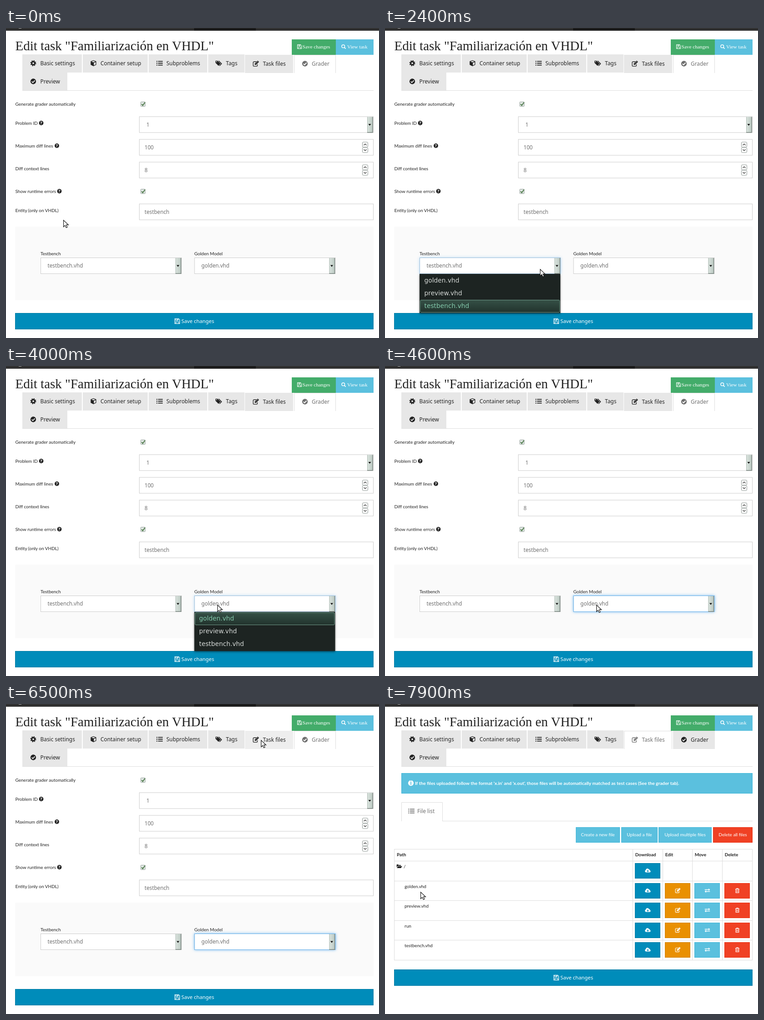
Write an HTML page that moves like this. It is 821 px wide and 682 px high and loops after 8 s.

```html
<!DOCTYPE html>
<html lang="en">
<head>
<meta charset="utf-8">
<title>Edit task</title>
<style>
html, body { margin: 0; width: 100%; height: 100%; overflow: hidden; background: #fff; }
svg { display: block; }
text { font-family: "Noto Sans", sans-serif; font-size: 11.9px; fill: #222; white-space: pre; }
.title { font: 29px "Liberation Serif", serif; }
.serif { font: 11.25px "Liberation Serif", serif; fill: #fff; }
.label { font: 10px Lato, sans-serif; }
.bold { font: bold 10px Lato, sans-serif; }
.note { font: bold 10.2px Lato, sans-serif; fill: #fff; }
.btn { font: 10.1px Lato, sans-serif; fill: #fff; }
.field { font-size: 11.7px; fill: #6f6f6f; }
.save { font-size: 11.3px; fill: #fff; }
.item { font: 13.8px "DejaVu Sans", sans-serif; fill: #d5d9d7; }
.picked { fill: #83c9ab; }
.active { fill: #6f6f6f; }
.glow { filter: drop-shadow(0 0 3px rgba(82, 168, 236, .75)); }
.menu { filter: drop-shadow(0 2px 2px rgba(0, 0, 0, .45)); }

#form, #files, #hover, .menu, .glow { animation: 8s step-end infinite; }
#form { animation-name: leave; }
#files { animation-name: enter; }
#hover { animation-name: hover; }
#menuA { animation-name: menuA; }
#menuB { animation-name: menuB; }
#glowA { animation-name: glowA; }
#glowB { animation-name: glowB; }
@keyframes leave { 0% { visibility: visible } 82.5%, 100% { visibility: hidden } }
@keyframes enter { 0% { visibility: hidden } 82.5%, 100% { visibility: visible } }
@keyframes hover { 0% { opacity: 0 } 81.25%, 100% { opacity: 1 } }
@keyframes menuA { 0% { opacity: 0 } 30% { opacity: 1 } 45%, 100% { opacity: 0 } }
@keyframes menuB { 0% { opacity: 0 } 50% { opacity: 1 } 57.5%, 100% { opacity: 0 } }
@keyframes glowA { 0% { opacity: 0 } 30% { opacity: .5 } 33.75% { opacity: 1 } 50%, 100% { opacity: 0 } }
@keyframes glowB { 0% { opacity: 0 } 50% { opacity: .5 } 51.25%, 100% { opacity: 1 } }

/* The pointer moves in 100 ms ticks, 1.25% each. */
#pointer { animation: pointer 8s linear infinite; }
@keyframes pointer {
  0% { transform: translate(126px, 422px); animation-timing-function: steps(3) }
  3.75% { transform: translate(262px, 406px); animation-timing-function: steps(3) }
  7.5%, 8.75% { transform: translate(359px, 399px); animation-timing-function: steps(4) }
  13.75%, 15% { transform: translate(314px, 513px); animation-timing-function: steps(1) }
  16.25% { transform: translate(316px, 510px); animation-timing-function: steps(4) }
  21.25% { transform: translate(447px, 481px); animation-timing-function: steps(5) }
  27.5%, 38.75% { transform: translate(341px, 530px); animation-timing-function: steps(3) }
  42.5%, 47.5% { transform: translate(470px, 516px); animation-timing-function: steps(2) }
  50%, 60% { transform: translate(465px, 525px); animation-timing-function: steps(2) }
  62.5% { transform: translate(515px, 415px); animation-timing-function: steps(2) }
  65% { transform: translate(605px, 165px); animation-timing-function: steps(2) }
  67.5% { transform: translate(578px, 72px); animation-timing-function: steps(2) }
  70%, 83.75% { transform: translate(561px, 79px); animation-timing-function: steps(2) }
  86.25% { transform: translate(470px, 190px); animation-timing-function: steps(4) }
  91.25% { transform: translate(130px, 452px); animation-timing-function: steps(3) }
  95% { transform: translate(80px, 409px); animation-timing-function: steps(1) }
  96.25%, 97.5% { transform: translate(79px, 410px); animation-timing-function: steps(1) }
  98.75%, 100% { transform: translate(78px, 413px) }
}
</style>
</head>
<body>
<svg id="stage" width="821" height="682" viewBox="0 0 821 682"></svg>
<script>
const line = (d, w, color = 'currentColor') =>
  `<path d="${d}" fill="none" stroke="${color}" stroke-width="${w}"/>`;
const solid = (d, color = 'currentColor') => `<path d="${d}" fill="${color}"/>`;
const disc = '<circle r="6.6" fill="currentColor"/>';
const sign = c => `<text y="4.6" text-anchor="middle" style="font:bold 12.5px 'Noto Sans',sans-serif;fill:var(--bg)">${c}</text>`;

// Icons live in a box from -7 to 7; --bg is the colour showing through.
const icons = {
  cog: '<circle r="3.7" fill="none" stroke="currentColor" stroke-width="3.2"/>' +
    '<circle r="5.9" fill="none" stroke="currentColor" stroke-width="2.2" stroke-dasharray="2.32"/>',
  cube: solid('M0-7 6.6-4.6V3.7L0 7-6.6 3.7V-4.6Z') +
    solid('M0-5.6 4.7-3.9 0-2.2-4.7-3.9ZM.9-.8 5.3-2.4V3L.9 5.2Z', 'var(--bg)'),
  list: line('M-7.5-4.5h2.4M-7.5 0h2.4M-7.5 4.5h2.4M-3.5-4.5H7.5M-3.5 0H7.5M-3.5 4.5H7.5', 2),
  tags: solid('M-8.5-6H-3.5L3.5 1-1.5 6.2-8.5-1Z') + line('M-1-5.6 5.8 1.2 1 6.2', 1.7) +
    '<circle cx="-6" cy="-3.6" r="1.2" fill="var(--bg)"/>',
  edit: line('M3.6 1.4V4Q3.6 6 1.6 6H-4.4Q-6.4 6-6.4 4V-2.6Q-6.4-4.6-4.4-4.6H1.4', 1.4) +
    solid('M-2.6 2.6V-.4L4.4-7.2 7.4-4.2.4 2.6Z') + line('M-1 0 5-5.4', .7, 'var(--bg)'),
  check: disc + line('M-3.6.1-.9 2.8 3.8-2.2', 2.1, 'var(--bg)'),
  help: disc + sign('?'),
  info: disc + sign('i'),
  save: line('M-6.3-6.3H3.6L6.3-3.6V6.3H-6.3Z', 1.4) + line('M-3.6 6V1.4H3.6V6M-3.6-6V-2.2H2.2V-6', 1.3) +
    solid('M-.2-5.5h1.8v2.6h-1.8z'),
  search: '<circle cx="-1" cy="-1" r="4.4" fill="none" stroke="currentColor" stroke-width="2"/>' + line('M2.3 2.3 6.2 6.2', 2.4),
  folder: solid('M-7.5 3V-4Q-7.5-5-6.5-5H-3L-2-3.6H3.6Q4.6-3.6 4.6-2.4V-1.4H-3.8Z') + solid('M-3.4-.4H8L4.6 5H-7Z'),
  cloud: solid('M-5 5A3.5 3.5 0 0 1-5.6-1.6 4.6 4.6 0 0 1 3-3 3 3 0 0 1 5.6-.7 3 3 0 0 1 5 5Z') +
    solid('M-1-1.6H1V1H3L0 4-3 1H-1Z', 'var(--bg)'),
  swap: line('M-7-2.5H4M7 2.5H-4', 1.8) + solid('M3.4-5.8 7.2-2.5 3.4.8ZM-3.4-.8-7.2 2.5-3.4 5.8Z'),
  trash: line('M-5.4-3.8H5.4M-2-4V-5.8H2V-4', 1.4) + line('M-4-3.4V5.6H4V-3.4M-1.5-1.2V3.4M1.5-1.2V3.4', 1.4)
};

const icon = (name, x, y, size = 13, color = '#222', bg = '#fff') =>
  `<g transform="translate(${x} ${y}) scale(${size / 14})" style="color:${color};--bg:${bg}">${icons[name]}</g>`;
const text = (x, y, s, cls = '', extra = '') => `<text x="${x}" y="${y}" class="${cls}" ${extra}>${s}</text>`;
const rect = (x, y, w, h, fill, stroke, extra = '') => stroke
  ? `<rect x="${x + .5}" y="${y + .5}" width="${w - 1}" height="${h - 1}" fill="${fill}" stroke="${stroke}" ${extra}/>`
  : `<rect x="${x}" y="${y}" width="${w}" height="${h}" fill="${fill}" ${extra}/>`;

const BLUE = ['#008cba', '#0079a1'], SKY = ['#5bc0de', '#3db5d8'],
  RED = ['#f04124', '#ea2f10'], AMBER = ['#e99002', '#d08002'];

const tab = (x, y, w, name, label, tx, ix) =>
  rect(x, y, w, 40, '#e7e7e7') + icon(name, ix, y + 19.5, 13, '#222', '#e7e7e7') + text(tx, y + 24, label);
const openTab = (x, y, w, h, name, label, tx, ix) =>
  rect(x, y, w, h, '#fff') + line(`M${x + .5} ${y + h}V${y + .5}H${x + w - .5}V${y + h}`, 1, '#ddd') +
  icon(name, ix, y + 19.5, 13, '#6f6f6f') + text(tx, y + 23.5, label, 'active');
const arrow = (x, y) =>
  rect(x - 13, y + 1, 12, 34, 'url(#knob)') + line(`M${x - 12.5} ${y + 1}V${y + 35}`, 1, '#aebbb5') +
  line(`M${x - 1} ${y + 1}V${y + 35.3}H${x - 13}`, 1.4, '#76827d') +
  solid(`M${x - 10.5} ${y + 16.5}h6l-3 4z`, '#111');
const input = (y, value) => rect(293, y, 516, 36, '#fff', '#ccc') + text(305, y + 22, value, 'field');
const spin = y => [6, 18].map((dy, i) =>
  rect(784, y + dy, 13, 12, '#fff', '#8d9692', 'rx="2"') +
  line(i ? `M787.5 ${y + 22.5}l3 3 3-3` : `M787.5 ${y + 13.5}l3-3 3 3`, 1.2, '#333')).join('');
const checkbox = y => rect(296, y, 11, 11, '#dfe6e2', '#9aa5a0', 'rx="1"') +
  line(`M298.5 ${y + 5.5}l2.5 2.8 5-6.8`, 2, '#4f7a4b');
const label = (y, s, hx) => text(20.5, y + 3.5, s, 'label') + (hx ? icon('help', hx, y, 10.5) : '');
const select = (x, id, name, value) =>
  text(x, 499.5, name, 'label') + rect(x, 505, 311, 36, '#fff', '#ccc') +
  rect(x, 505, 311, 36, '#fff', '#66afe9', `class="glow" id="glow${id}"`) +
  text(x + 15.5, 526.5, value, 'field') + arrow(x + 310, 505);
const menu = (x, id, pick) => `<g class="menu" id="menu${id}">` + rect(x, 541, 310, 86, '#1d2422') +
  rect(x + 1, 542 + 28 * pick, 308, 28, 'url(#pick)', '#709b89', 'rx="2"') +
  ['golden.vhd', 'preview.vhd', 'testbench.vhd'].map((s, i) =>
    text(x + 10.5, 560 + 28 * i, s, 'item' + (i === pick ? ' picked' : ''))).join('') + '</g>';
const saveBar = y => rect(20, y, 789, 36, ...BLUE) + icon('save', 377, y + 18, 12, '#fff', BLUE[0]) +
  text(386, y + 22, 'Save changes', 'save');
const button = (x, w, s, colors) => rect(x, 271, w, 34, ...colors) +
  text(x + w / 2, 291, s, 'btn', 'text-anchor="middle"');
const iconButton = (x, y, name, colors) => rect(x, y, 56, 34, ...colors) +
  icon(name, x + 28.5, y + 16.5, 11.5, '#fff', colors[0]);

const header =
  rect(0, 0, 821, 6, '#303030') + rect(414, 0, 136, 6, '#1c1c1c') + rect(28, 0, 6, 1, '#aaa') +
  text(20.5, 49, 'Edit task "Familiarización en VHDL"', 'title') +
  rect(629, 25, 97, 34, '#43ac6a') + icon('save', 646, 41, 10, '#fff') + text(652.5, 45, 'Save changes', 'serif') +
  rect(726, 25, 83, 34, SKY[0]) + icon('search', 743, 41, 10.5, '#fff') + text(751, 45, 'View task', 'serif') +
  tab(36, 58, 131, 'cog', 'Basic settings', 75.5, 60) +
  tab(169, 58, 143, 'cube', 'Container setup', 208, 192.5) +
  tab(314, 58, 129, 'list', 'Subproblems', 353, 338) +
  tab(445, 58, 80, 'tags', 'Tags', 484, 469) +
  tab(36, 98, 99, 'check', 'Preview', 75.5, 60) +
  line('M36 137.5H809', 1, '#ddd');

const form = '<g id="form">' +
  tab(526, 59, 106, 'edit', 'Task files', 565.5, 550) +
  '<g id="hover">' + rect(526, 59, 106, 40, '#eee') + icon('edit', 550, 78.5, 13, '#222', '#eee') +
  text(565.5, 83, 'Task files') + '</g>' +
  openTab(634, 59, 92, 40, 'check', 'Grader', 673, 658) +
  label(167, 'Generate grader automatically') + checkbox(162) +
  label(209, 'Problem ID', 77.5) + rect(293, 194.5, 516, 36, '#fff', '#ccc') + text(309, 216.5, '1', 'field') + arrow(808, 194.5) +
  label(259, 'Maximum diff lines', 112) + input(244.5, '100') + spin(244.5) +
  label(309, 'Diff context lines') + input(294.5, '8') + spin(294.5) +
  label(359, 'Show runtime errors', 117.5) + checkbox(354) +
  label(401, 'Entity (only on VHDL)') + input(386.5, 'testbench') +
  rect(20, 437, 789, 162, '#fafafa') +
  select(76, 'A', 'Testbench', 'testbench.vhd') + select(414.5, 'B', 'Golden Model', 'golden.vhd') +
  saveBar(627) + menu(76, 'A', 2) + menu(414.5, 'B', 0) + '</g>';

const rows = ['/', 'golden.vhd', 'preview.vhd', 'run', 'testbench.vhd'];
const rowY = i => 345.5 + 43.6 * i;
const cols = [545.5, 611.5, 676.5, 742.5];
const files = '<g id="files">' +
  openTab(526, 59, 106, 40, 'edit', 'Task files', 565.5, 550) +
  tab(634, 59, 92, 'check', 'Grader', 673, 658) +
  rect(36, 152, 773, 45, ...SKY) + icon('info', 57, 174, 13, '#fff', SKY[0]) +
  text(66, 177.5, "If the files uploaded follow the format 'x.in' and 'x.out', those files will be automatically matched as test cases (See the grader tab).", 'note') +
  line('M36 257.5H809', 1, '#ddd') + openTab(36, 216, 91, 42, 'list', 'File list', 71, 58) +
  button(420, 97, 'Create a new file', SKY) + button(520, 80, 'Upload a file', SKY) +
  button(602, 117, 'Upload multiple files', SKY) + button(722, 87, 'Delete all files', RED) +
  rect(20, 319, 789, 245, '#fff', '#ddd') +
  cols.map(x => line(`M${x} 319V563`, 1, '#ddd')).join('') +
  text(26, 335, 'Path', 'bold') +
  ['Download', 'Edit', 'Move', 'Delete'].map((s, i) => text(cols[i] + 5.2, 335, s, 'bold')).join('') +
  icon('folder', 31.5, 357, 11) +
  rows.map((s, i) => {
    const y = Math.round(rowY(i) + 4.5);
    return line(`M20 ${Math.floor(rowY(i)) + .5}H809`, 1, '#ddd') + text(i ? 43 : 41, y + 11, s, 'label') +
      iconButton(550, y, 'cloud', BLUE) +
      (i ? iconButton(616, y, 'edit', AMBER) + iconButton(681, y, 'swap', SKY) + iconButton(747, y, 'trash', RED) : '');
  }).join('') + saveBar(584) + '</g>';

const defs = '<defs><linearGradient id="knob"><stop stop-color="#dbe4df"/><stop offset="1" stop-color="#bccac3"/></linearGradient>' +
  '<linearGradient id="pick" x2="0" y2="1"><stop stop-color="#355046"/><stop offset="1" stop-color="#22332d"/></linearGradient></defs>';
const pointer = '<g id="pointer"><path d="M.6.8V15.4L4 12.2 6.4 17.3 9 16.1 6.6 11.2H11.4Z" fill="#fff" stroke="#1a1a1a" stroke-width="1.2"/></g>';

document.getElementById('stage').innerHTML = defs + header + form + files + pointer;
</script>
</body>
</html>
```
